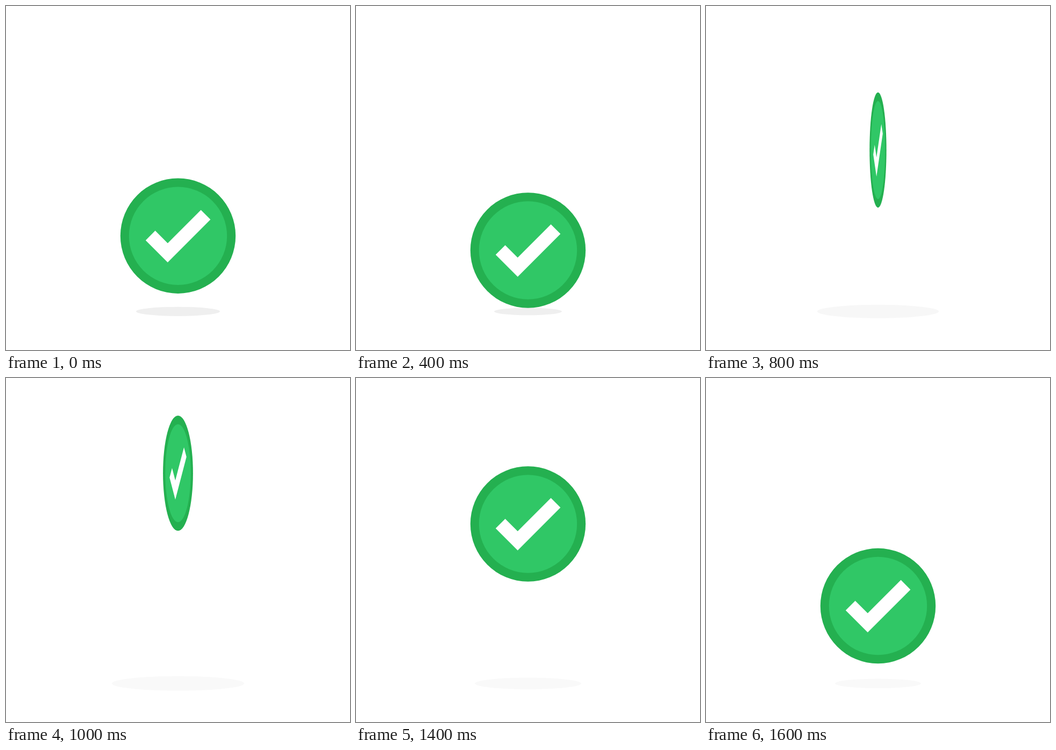
These frames come from a looping animation (640 px wide and 640 px high, 1700 ms). An HTML page with a canvas:

```html
<!DOCTYPE html>
<html lang="en">
<head>
<meta charset="utf-8">
<title>Bouncing check</title>
<style>
  html, body { margin: 0; width: 100%; height: 100%; overflow: hidden; background: #fff; }
  canvas { display: block; width: 640px; height: 640px; }
</style>
</head>
<body>
<canvas id="stage" width="640" height="640"></canvas>
<script>
const ctx = document.getElementById('stage').getContext('2d');
const LOOP = 1700;
const STEP = 100;
const CENTER = 320;

// Eased progress from 0 to 1 between two times.
function progress(t, start, end) {
  const u = Math.min(1, Math.max(0, (t - start) / (end - start)));
  return u * u * (3 - 2 * u);
}

function ellipse(x, y, rx, ry, color) {
  ctx.fillStyle = color;
  ctx.beginPath();
  ctx.ellipse(x, y, rx, ry, 0, 0, Math.PI * 2);
  ctx.fill();
}

function drawShadow(t) {
  const grow = progress(t, 396, 941);
  const radius = 78 - 15 * progress(t, 0, 400) + 60 * grow - 43 * progress(t, 1161, 1600);
  const shade = Math.round(239 + 10 * grow);
  ellipse(CENTER, 568.3, radius, radius * 0.11, `rgb(${shade},${shade},${shade})`);
}

// Two diagonal strokes: a short arm down to the corner, a long arm up.
function drawCheck() {
  const x = -19.2, y = 31.4, short = 32.1, long = 70.7;
  ctx.strokeStyle = '#fff';
  ctx.lineWidth = 25.2;
  ctx.lineJoin = 'miter';
  ctx.beginPath();
  ctx.moveTo(x - short, y - short);
  ctx.lineTo(x, y);
  ctx.lineTo(x + long, y - long);
  ctx.stroke();
}

function drawBadge(t) {
  const dip = 26.8 * progress(t, 0, 403);
  const rise = 283.5 * progress(t, 403, 1057);
  const fall = 256.7 * progress(t, 1230, 1628);
  const width = 1 - progress(t, 548, 880) + progress(t, 880, 1239);
  ctx.save();
  ctx.translate(CENTER, 427.7 + dip - rise + fall);
  ctx.scale(width, 1);
  ellipse(0, 0, 107.2, 107.2, '#24b050');
  ellipse(0, 0, 91.2, 91.2, '#30c766');
  drawCheck();
  ctx.restore();
}

function render(now) {
  const t = Math.floor((now % LOOP) / STEP) * STEP;
  ctx.fillStyle = '#fff';
  ctx.fillRect(0, 0, 640, 640);
  drawShadow(t);
  drawBadge(t);
  requestAnimationFrame(render);
}

render(0);
</script>
</body>
</html>
```
